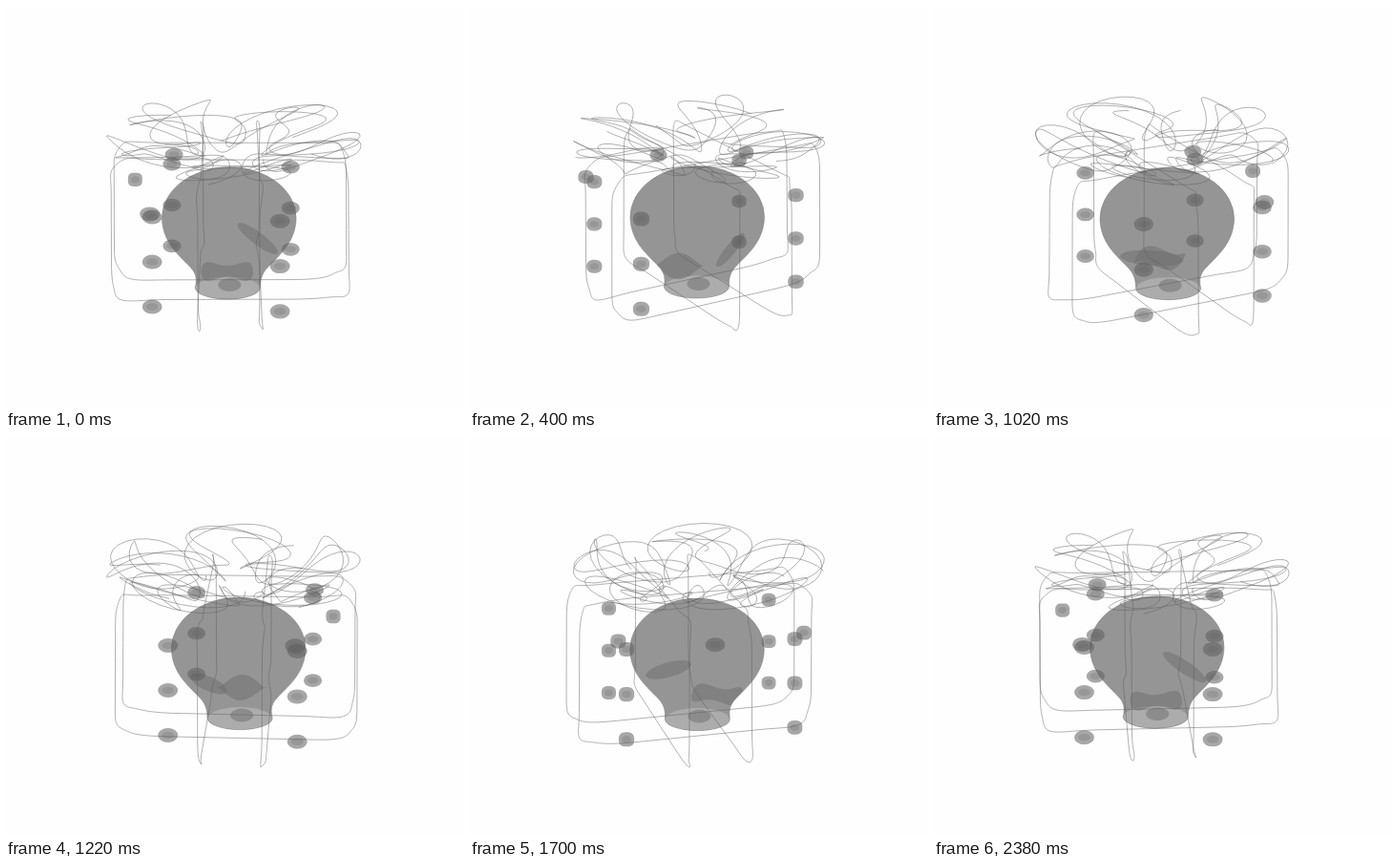
These frames come from a looping animation (480 by 420 pixels, 2400 ms). An HTML page with a canvas:

```html
<!DOCTYPE html>
<html>
<head>
<meta charset="utf-8">
<style>
html, body { margin: 0; width: 100%; height: 100%; overflow: hidden; background: #fefefe; }
canvas { display: block; }
</style>
</head>
<body>
<canvas id="stage" width="480" height="420"></canvas>
<script>
const ctx = document.getElementById('stage').getContext('2d');
const LOOP = 2400, STEP = 20, TAU = Math.PI * 2;
const AXIS_X = 238.8, HORIZON = 206, TILT = 0.33, DISTANCE = 1900;
let cos = 1, sin = 0;

// World points are [x, z toward the viewer, y downward], turning about the y axis.
function project([x, z, y]) {
  const depth = x * sin + z * cos;
  const scale = 1 / (1 - depth / DISTANCE);
  return [AXIS_X + (x * cos - z * sin) * scale, HORIZON + (y + depth * TILT) * scale, scale];
}

function sample(count, turns, pointAt) {
  return Array.from({ length: count + 1 }, (_, i) => pointAt(i / count * turns * TAU));
}

// Upright wire frames: rounded rectangles laid out like a hash sign.
function makeFrame(index) {
  const turned = index > 1;
  const offset = index % 2 ? -31 : 31;
  const square = v => Math.sign(v) * Math.abs(v) ** 0.16;
  return sample(240, 1, u => {
    const along = 123 * square(Math.cos(u)) + 1.5 * Math.sin(5 * u + index);
    const across = offset + 2 * Math.sin(3 * u + index * 2);
    const y = 21 + 73 * square(Math.sin(u)) + 2 * Math.sin(4 * u + index);
    return turned ? [across - 4, along - 10, y] : [along - 4, across - 10, y];
  });
}

// Loose wires wander around the top, rising where they swing outward.
function makeTangle(index) {
  return sample(160, 0.9, u => {
    const swing = Math.sin(5 * u + index * 1.7);
    const radius = 85 + 48 * swing;
    const around = u + index * TAU / 4 + 0.35 * Math.cos(7 * u + index);
    return [
      radius * Math.cos(around),
      radius * Math.sin(around),
      -60 - 9 * swing + 9 * Math.sin(8 * u + index * 2)
    ];
  });
}

const wires = [0, 1, 2, 3].flatMap(i => [makeFrame(i), makeTangle(i)]);

const columns = [[-82, 80], [46, 92], [62, -82], [-68, -92]];
const beads = columns.flatMap(([x, z]) =>
  [0, 1, 2].map(row => ({ at: [x, z, -12 + 45 * row], turn: 0 })));
beads.push(
  { at: [-84, 89, -18], turn: 0 },
  { at: [-66, -100, -20], turn: 0 },
  { at: [-104, -10, -21], turn: TAU / 4 }
);

// A leaf standing inside the vase and a disc lying below it.
const leaf = sample(40, 1, u => {
  const c = Math.cos(u), s = Math.sin(u);
  return [25 + 21 * c, -25 + 30 * c, 46 + 4 * c + 8 * s];
});
const disc = sample(40, 1, u =>
  [-7 + 27 * Math.cos(u), 19 + 27 * Math.sin(u), 65 + 4 * Math.sin(3 * u)]);

function trace(points) {
  ctx.beginPath();
  for (const point of points) {
    const [x, y] = project(point);
    ctx.lineTo(x, y);
  }
}

function fillEllipse(x, y, rx, ry) {
  ctx.beginPath();
  ctx.ellipse(x, y, rx, ry, 0, 0, TAU);
  ctx.fill();
}

function vasePath(baseX) {
  ctx.beginPath();
  ctx.ellipse(0, 222, 70.3, 53.5, 0, Math.PI, TAU);
  ctx.bezierCurveTo(70, 246, 54, 260, 43, 271);
  ctx.bezierCurveTo(35, 279, 33, 284, baseX + 34, 295);
  ctx.ellipse(baseX, 295, 34, 12, 0, 0, Math.PI);
  ctx.bezierCurveTo(-33, 284, -35, 279, -43, 271);
  ctx.bezierCurveTo(-54, 260, -70, 246, -70.3, 222);
  ctx.closePath();
}

function drawVase() {
  const [x, y] = project([-5, -2.2, 0]);
  const baseX = -1.5 * cos;
  ctx.save();
  ctx.translate(x, y - HORIZON + 0.8);
  vasePath(baseX);
  ctx.fillStyle = 'rgb(149,149,149)';
  ctx.fill();
  ctx.strokeStyle = 'rgba(125,125,125,0.5)';
  ctx.stroke();
  ctx.clip();
  ctx.fillStyle = 'rgb(172,172,172)';
  fillEllipse(baseX, 295, 33.5, 11.5);
  ctx.fillStyle = 'rgba(110,110,110,0.5)';
  fillEllipse(baseX + 2, 292, 12, 7);
  ctx.translate(-x, HORIZON - y - 0.8);
  for (const shape of [leaf, disc]) {
    trace(shape);
    ctx.fill();
  }
  ctx.restore();
}

function drawBead({ at, turn }, angle) {
  const [x, y, scale] = project(at);
  const face = Math.abs(Math.cos(angle + turn));
  const w = Math.hypot(20 * face, 15 * Math.sin(angle + turn)) * scale;
  const h = 14.3 * scale;
  const round = 0.35 + 0.15 * face;
  ctx.beginPath();
  ctx.roundRect(x - w / 2, y - h / 2, w, h, { x: w * round, y: h * round });
  ctx.fillStyle = 'rgba(95,95,95,0.55)';
  ctx.fill();
  ctx.fillStyle = 'rgba(95,95,95,0.22)';
  fillEllipse(x, y, w * 0.3, h * 0.25);
}

function draw(t) {
  const angle = t / LOOP * TAU;
  cos = Math.cos(angle);
  sin = Math.sin(angle);
  ctx.fillStyle = '#fefefe';
  ctx.fillRect(0, 0, 480, 420);
  drawVase();
  ctx.lineWidth = 1;
  ctx.lineJoin = 'round';
  ctx.strokeStyle = 'rgba(95,95,95,0.48)';
  for (const wire of wires) {
    trace(wire);
    ctx.stroke();
  }
  for (const bead of beads) drawBead(bead, angle);
}

const start = performance.now();
function tick() {
  const t = (performance.now() - start) % LOOP;
  draw(Math.floor(t / STEP) * STEP);
  requestAnimationFrame(tick);
}
tick();
</script>
</body>
</html>
```
